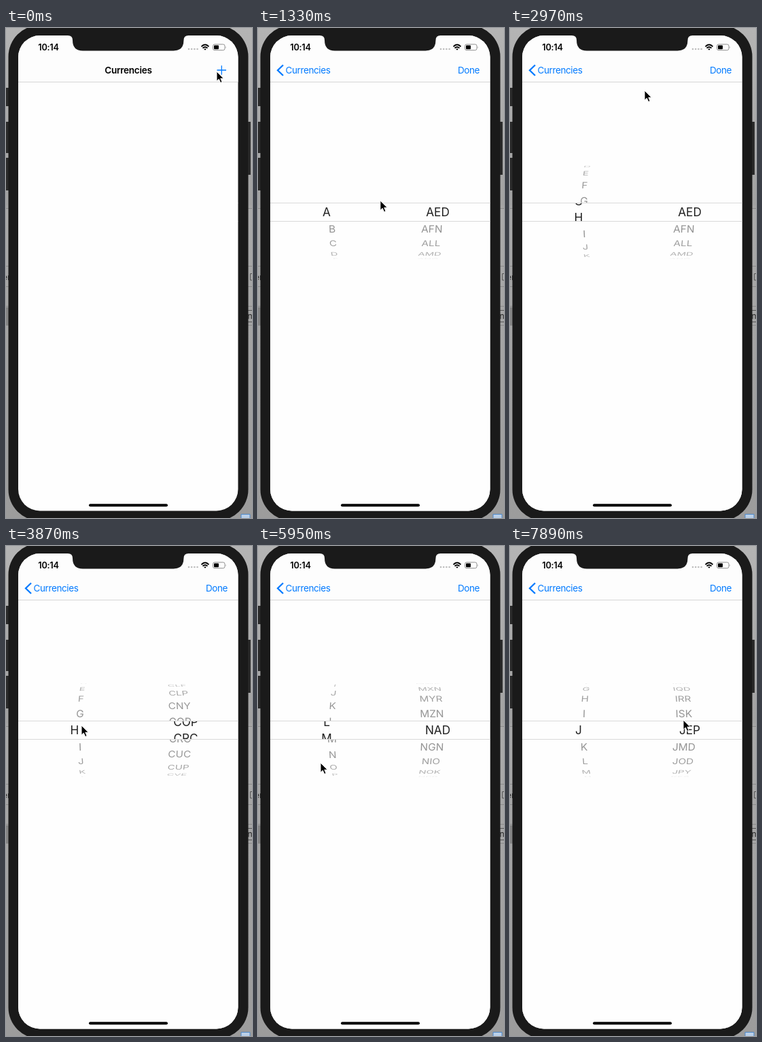
These frames come from a looping animation (362 by 721 pixels, 8000 ms). An HTML page:

```html
<!DOCTYPE html>
<html lang="en">
<head>
<meta charset="utf-8">
<title>Currencies</title>
<style>
  html, body { margin: 0; width: 100%; height: 100%; overflow: hidden; background: #a6a6a6; }
  svg { display: block; width: 362px; height: 721px; font-family: Inter, Roboto, sans-serif; }
  .mid { text-anchor: middle; }
  .nav { font-size: 13.5px; letter-spacing: -.4px; fill: #007aff; }
  .title { font-size: 13.6px; font-weight: 600; letter-spacing: -.3px; fill: #000; }
  .clock { font-size: 12.7px; font-weight: 600; letter-spacing: -.25px; }
  .wheel { font-size: 17.2px; fill: #000; }
</style>
</head>
<body>
<svg viewBox="0 0 362 721">
  <defs>
    <clipPath id="screen"><rect x="18" y="11" width="323.5" height="699.5" rx="32"/></clipPath>
    <clipPath id="band"><rect x="18" y="258" width="324" height="26"/></clipPath>
    <clipPath id="around"><path d="M18 202.500H342V257H18ZM18 285H342V339.500H18Z"/></clipPath>
    <linearGradient id="desk" x1="0" x2="0" y1="0" y2="1">
      <stop offset="0" stop-color="#b4b4b4"/>
      <stop offset=".36" stop-color="#a2a2a2"/>
      <stop offset=".37" stop-color="#aaa"/>
      <stop offset="1" stop-color="#9c9c9c"/>
    </linearGradient>
  </defs>

  <rect width="362" height="721" fill="url(#desk)"/>
  <path d="M0 265.500H362M0 350.500H362M0 380.500H362M0 409.500H362M0 437.500H362" stroke="#8a8a8a"/>
  <rect y="411" width="5" height="26" fill="#858585"/>
  <text x="-5" y="370.500" font-size="12" fill="#222">er</text>
  <path d="M364 361.500H359.500V371H364M364 415.500H354V432.500H364" fill="none" stroke="#555"/>
  <text x="355.500" y="428" font-size="12" fill="#222">n</text>
  <path d="M0 88H5V115H0ZM0 138H5V184H0ZM0 191H5V239H0ZM356 138H360V216H356Z" fill="#2b2b2b"/>
  <rect x="3.500" y="-4" width="353" height="729" rx="46" fill="#1a1a1a"/>
  <path d="M346 721V715.500H359V721" fill="#b9cfe8" stroke="#4c86c6"/>

  <g clip-path="url(#screen)">
    <rect x="18" y="11" width="324" height="700" fill="#fefefe"/>
    <rect id="dim" x="18" y="80" width="324" height="631"/>
    <g id="page">
      <rect x="18" y="80" width="324" height="631" fill="#fefefe"/>
      <path d="M18 257.500H342M18 284.500H342" stroke="#d9d9d9"/>
      <g id="outer" class="wheel mid" clip-path="url(#around)"></g>
      <g id="inner" class="wheel mid" clip-path="url(#band)"></g>
    </g>
    <rect x="18" y="11" width="324" height="68" fill="#fdfdfd"/>
    <path d="M18 79.500H342" stroke="#d6d6d6"/>

    <text id="title" class="title mid" y="67">Currencies</text>
    <text id="back" class="nav mid" y="67">Currencies</text>
    <path id="chevron" d="M37 54.500L29 62.200L37 70" fill="none" stroke="#007aff" stroke-width="2.300"/>
    <text id="done" class="nav mid" x="310" y="67">Done</text>
    <path id="plus" d="M310.500 62H324M317.300 55.300V68.800" stroke="#007aff" stroke-width="1.300"/>

    <text class="clock mid" x="62.500" y="33">10:14</text>
    <path d="M91 10V11Q98 11 98 18Q98 33.500 113 33.500H246.500Q261.500 33.500 261.500 18Q261.500 11 268.500 11V10Z" fill="#1a1a1a"/>
    <path d="M269 31H282" stroke="#bdbdbd" stroke-width="2.600" stroke-linecap="round" stroke-dasharray="0 4.200"/>
    <g fill="none" stroke="#000" stroke-width="1.900">
      <path d="M287.500 27.300Q293 21.700 298.500 27.300M289.500 29.600Q293 26.200 296.500 29.600"/>
      <path d="M291.300 31L293 32.800L294.700 31Q293 29.600 291.300 31Z" fill="#000" stroke="none"/>
    </g>
    <rect x="304.500" y="24" width="17.500" height="8.700" rx="2.500" fill="none" stroke="#8e8e8e"/>
    <rect x="306" y="25.500" width="7" height="5.700" rx="1" fill="#000"/>
    <path d="M323.200 27V30Q324.500 28.500 323.200 27Z" fill="#8e8e8e"/>
    <rect x="122" y="700.300" width="116" height="3.900" rx="1.950" fill="#000"/>
  </g>

  <path id="cursor" d="M0 0V14.300L3.300 11.200L5.700 16.600L8.100 15.500L5.800 10.300H10.300Z" fill="#000" stroke="#fff" stroke-width="1" stroke-linejoin="round"/>
</svg>
<script>
const LOOP = 8000, STEP = 148.7;
const MID_X = 180, MID_Y = 271, RADIUS = 68.5, ROW_ANGLE = 21 * Math.PI / 180;
const $ = id => document.getElementById(id);

const letters = [..."ABCDEFGHIJKLMNOPQRSTUVWXYZ"];
const codes = ("AED AFN ALL AMD ANG AOA ARS AUD AWG AZN BAM BBD BDT BGN BHD BIF BMD BND BOB BRL BSD BTN BWP BYN BZD " +
  "CAD CDF CHF CLF CLP CNY COP CRC CUC CUP CVE CZK DJF DKK DOP DZD EGP ERN ETB EUR FJD FKP " +
  "GBP GEL GGP GHS GIP GMD GNF GTQ GYD HKD HNL HRK HTG HUF IDR ILS IMP INR IQD IRR ISK JEP JMD JOD JPY " +
  "KES KGS KHR KMF KPW KRW KWD KYD KZT LAK LBP LKR LRD LSL LYD MAD MDL MGA MKD MMK MNT MOP MRU MUR MVR MWK MXN MYR MZN " +
  "NAD NGN NIO NOK NPR NZD OMR PAB PEN").split(" ");
const [HKD, JEP, NAD] = ["HKD", "JEP", "NAD"].map(c => codes.indexOf(c));

// Keys are [time, value...]
const letterKeys = [[1560, 0], [2200, 5], [2530, 6.05], [2974, 6.68], [3300, 7], [3880, 7],
  [4200, 11.2], [4450, 13], [5720, 13], [5948, 11.5], [6300, 9.6], [6700, 9]];
const codeKeys = [[3530, 0], [3866, 31.5], [4250, HKD], [4840, HKD], [5450, NAD], [7170, NAD], [7870, JEP]];
const cursorKeys = [[0, 310, 64], [140, 312, 64], [750, 312, 64], [1338, 180, 254], [1487, 126, 276], [1620, 122, 274],
  [2200, 126, 150], [2530, 129, 131], [2720, 165, 80], [2974, 198, 92], [3300, 145, 190], [3560, 77, 268],
  [3866, 111, 264], [4150, 117, 180], [4450, 112, 112], [4850, 112, 112], [5450, 86, 275], [5720, 90, 281],
  [5948, 92, 319], [6200, 96, 357], [6400, 104, 361], [7140, 221, 310], [7360, 285, 275], [7600, 270, 259], [7860, 255, 256]];

// Smooth curve through the keys that never overshoots them
function track(keys, t, c = 1) {
  const last = keys.length - 1;
  if (t <= keys[0][0]) return keys[0][c];
  if (t >= keys[last][0]) return keys[last][c];
  const i = keys.findIndex(k => k[0] > t) - 1;
  const slope = j => j < 0 || j >= last ? 0 : (keys[j + 1][c] - keys[j][c]) / (keys[j + 1][0] - keys[j][0]);
  const tangent = j => {
    const a = slope(j - 1), b = slope(j);
    return a * b <= 0 ? 0 : 2 * a * b / (a + b);
  };
  const h = keys[i + 1][0] - keys[i][0], u = (t - keys[i][0]) / h, v = 1 - u;
  return v * v * (1 + 2 * u) * keys[i][c] + u * u * (3 - 2 * u) * keys[i + 1][c]
    + h * u * v * (v * tangent(i) - u * tangent(i + 1));
}

function addTexts(parent, count) {
  return Array.from({ length: count }, () => {
    const el = document.createElementNS("http://www.w3.org/2000/svg", "text");
    el.setAttribute("y", 6.2);
    return parent.appendChild(el);
  });
}

function makeWheel(items, x) {
  return { items, x, outer: addTexts($("outer"), 10), inner: addTexts($("inner"), 4) };
}

function place(el, label, matrix, alpha) {
  el.textContent = label || "";
  el.setAttribute("transform", `matrix(${matrix.map(n => n.toFixed(4))})`);
  el.setAttribute("opacity", alpha.toFixed(3));
}

function drawWheel({ items, x, outer, inner }, pos) {
  const side = x - MID_X;
  outer.forEach((el, i) => {
    const row = Math.floor(pos) - 4 + i, angle = (row - pos) * ROW_ANGLE;
    const cos = Math.cos(angle), sin = Math.sin(angle);
    if (cos <= 0.01) return place(el, "", [1, 0, 0, 1, 0, 0], 0);
    const scale = .903 - .08 * (1 - cos), shear = -.08 * sin * side / RADIUS;
    place(el, items[row], [scale, 0, shear, .92 * cos, MID_X + side * scale, MID_Y + RADIUS * sin], .43 * cos ** .45);
  });
  inner.forEach((el, i) => {
    const row = Math.floor(pos) - 1 + i, angle = (row - pos) * ROW_ANGLE;
    place(el, items[row], [1, 0, 0, Math.cos(angle), x, MID_Y + .95 * RADIUS * Math.sin(angle)], .87);
  });
}

const wheels = [makeWheel(letters, 101), makeWheel(codes, 264.5)];

function fade(id, alpha) {
  $(id).setAttribute("opacity", Math.max(0, Math.min(1, alpha)).toFixed(3));
}

function drawPush(t) {
  const w = Math.max(0, t - 415) * .0144;
  const rest = w > 9 ? 0 : (1 + w) * Math.exp(-w), done = 1 - rest;
  const labelX = 73.5 + 106.5 * rest ** .9;
  $("page").setAttribute("transform", `translate(${(323.5 * rest).toFixed(2)} 0)`);
  $("title").setAttribute("x", labelX);
  $("back").setAttribute("x", labelX);
  fade("dim", .1 * done);
  fade("title", 1 - done * 1.05);
  fade("back", done);
  fade("chevron", done * 1.25);
  fade("done", done);
  fade("plus", 1 - done * 1.6);
}

function draw(t) {
  drawPush(t);
  drawWheel(wheels[0], track(letterKeys, t));
  drawWheel(wheels[1], track(codeKeys, t));
  $("cursor").setAttribute("transform", `translate(${track(cursorKeys, t).toFixed(2)} ${track(cursorKeys, t, 2).toFixed(2)})`);
}

const start = performance.now();
function tick() {
  const t = (performance.now() - start) % LOOP;
  draw(Math.floor((t + 12) / STEP) * STEP);
  requestAnimationFrame(tick);
}
tick();
</script>
</body>
</html>
```
